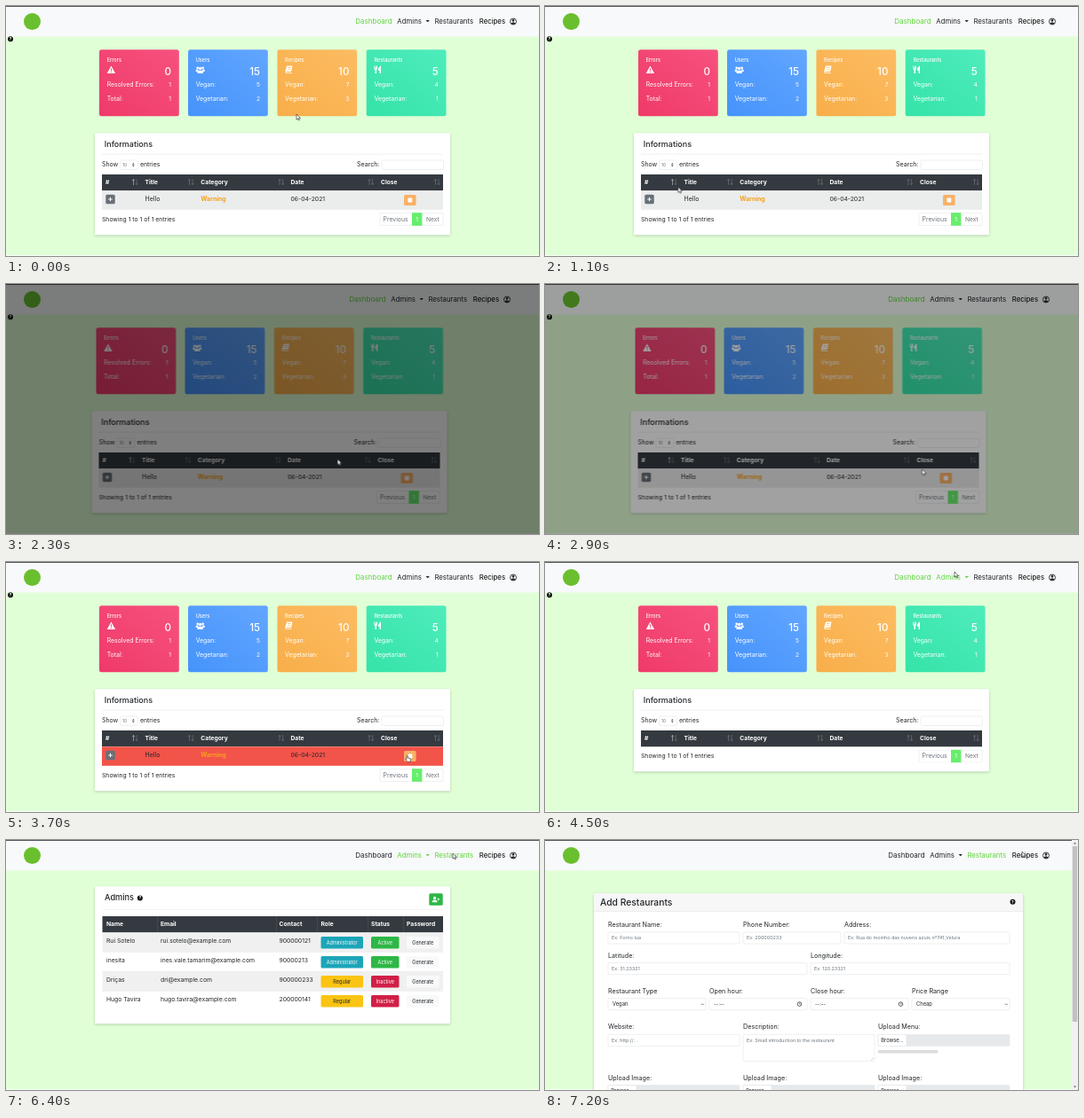
Recreate the animation shown at these times as an HTML page. Size 600 px wide and 282 px high, loop 7300 ms.

```html
<!DOCTYPE html>
<html lang="en">
<head>
<meta charset="utf-8">
<title>Dashboard tour</title>
<style>
html, body { margin: 0; width: 100%; height: 100%; overflow: hidden; background: #e0ffd6; }
svg { display: block; width: 600px; height: 282px; }
text { font-family: Inter, sans-serif; fill: #212529; white-space: pre; }
.w { fill: #fff; }
.g { fill: #6c757d; }
.b { font-weight: 700; }
.m { font-weight: 500; }
.mid { text-anchor: middle; }
.end { text-anchor: end; }
.card { fill: #fff; filter: drop-shadow(0 1px 1.5px #0003); }
.box { fill: #fff; stroke: #dcdfe2; stroke-width: .5; }

.nav, .dash, .dashPage, .adminPage, .formPage, .row, .foot, .infoCard, .dim, .red,
.lDash, .lAdmins, .lRest, .cur, .arrow, .hand { animation: 7.3s step-end infinite; }
.lDash, .lDash text { fill: #5fd63c; }
.nav { animation-name: nav; }
.dash { animation-name: dash; }
.dashPage { animation-name: dashPage; }
.adminPage { animation-name: adminPage; }
.formPage { animation-name: formPage; }
.row { animation-name: row; }
.foot { animation-name: foot; }
.infoCard { animation-name: infoCard; }
.dim { animation-name: dim; animation-timing-function: linear; }
.red { animation-name: red; animation-timing-function: linear; }
.lDash { animation-name: lDash; }
.lAdmins { animation-name: lAdmins; }
.lRest { animation-name: lRest; }
.cur { animation-name: cur; animation-timing-function: ease-in-out; }
.arrow { animation-name: arrow; }
.hand { animation-name: hand; }
.nav text { fill: inherit; }

@keyframes nav {
  0%, 41.2% { transform: none; }
  20.5%, 90.4% { transform: translateX(-7px); }
}
@keyframes dash {
  0%, 41.2% { transform: none; }
  20.5% { transform: translateX(-3.5px); }
}
@keyframes dashPage { 0% { visibility: visible; } 72.6%, 100% { visibility: hidden; } }
@keyframes adminPage { 0%, 90.4% { visibility: hidden; } 72.6% { visibility: visible; } }
@keyframes formPage { 0% { visibility: hidden; } 90.4%, 100% { visibility: visible; } }
@keyframes row { 0% { opacity: 1; } 56.1%, 100% { opacity: 0; } }
@keyframes foot { 0% { transform: none; } 56.1%, 100% { transform: translateY(-21.5px); } }
@keyframes infoCard { 0% { height: 115px; } 56.1%, 100% { height: 93px; } }
@keyframes dim {
  0%, 20.5%, 41.1%, 100% { opacity: 0; }
  21.9% { opacity: .43; }
  23.3%, 38.4% { opacity: .5; }
  39.7% { opacity: .38; }
}
@keyframes red { 0%, 47.9% { opacity: 0; } 49.3%, 100% { opacity: 1; } }
@keyframes lDash { 0% { fill: #5fd63c; } 72.6%, 100% { fill: #212529; } }
@keyframes lAdmins { 0%, 90.4% { fill: #212529; } 60.2% { fill: #5fd63c; } }
@keyframes lRest { 0% { fill: #212529; } 84.9%, 100% { fill: #5fd63c; } }
@keyframes cur {
  0%, 4% { transform: translate(327px, 122px); }
  19.2%, 23.3% { transform: translate(118px, 219px); }
  34%, 38.4% { transform: translate(405px, 195px); }
  39.7% { transform: translate(424.5px, 209px); }
  46.6%, 52% { transform: translate(451px, 218px); }
  60.3%, 66% { transform: translate(461px, 11px); }
  72%, 76.7% { transform: translate(461px, 31px); }
  85%, 91% { transform: translate(503px, 15px); }
  98.6%, 100% { transform: translate(537px, 13px); }
}
@keyframes arrow { 0%, 53.4% { opacity: 1; } 45.2% { opacity: 0; } }
@keyframes hand { 0%, 53.4% { opacity: 0; } 45.2% { opacity: 1; } }
</style>
</head>
<body>
<svg id="stage" viewBox="0 0 600 282"></svg>
<script>
const text = (x, y, size, str, cls = '') =>
  `<text x="${x}" y="${y}" font-size="${size}" class="${cls}">${str}</text>`;
const rect = (x, y, w, h, fill, r = 0, cls = '') =>
  `<rect x="${x}" y="${y}" width="${w}" height="${h}" rx="${r}" fill="${fill}" class="${cls}"/>`;
const path = (d, fill = '#fff', more = '') => `<path d="${d}" fill="${fill}" ${more}/>`;
const line = (d, color, width) => path(d, 'none', `stroke="${color}" stroke-width="${width}"`);
const group = (cls, ...parts) => `<g class="${cls}">${parts.flat().join('')}</g>`;
const at = (x, y, body) => `<g transform="translate(${x} ${y})">${body}</g>`;
const help = (x, y) => `<circle cx="${x}" cy="${y}" r="3" fill="#111"/>` +
  text(x, y + 1.8, 5, '?', 'w b mid');
const button = (x, y, w, h, fill, label, cls) =>
  rect(x, y, w, h, fill, 1.5) + text(x + w / 2, y + h / 2 + 2, 5.5, label, cls + ' mid');

const nav = () => [
  rect(0, 0, 600, 34.5, '#f8f9fa'),
  rect(0, 0, 600, 1, '#55585a'),
  '<circle cx="29.5" cy="17.5" r="9.5" fill="#6abf2e"/>',
  group('nav',
    group('lDash', text(393.3, 20.3, 8, 'Dashboard')),
    group('lAdmins', text(440.3, 20.3, 7.8, 'Admins'), '<path d="M472.5 16h4.4l-2.2 2.3z"/>'),
    group('lRest', text(482.4, 20.3, 7.8, 'Restaurants')),
    text(532.8, 20.3, 7.8, 'Recipes'),
    '<circle cx="571" cy="17.5" r="3.5" fill="none" stroke="#212529" stroke-width=".9"/>',
    path('M569.6 16.3a1.4 1.4 0 1 1 2.8 0a1.4 1.4 0 1 1-2.8 0M568.4 19.8q2.6-3 5.2 0q-2.6 2-5.2 0', '#212529'))
];

const icons = {
  warn: path('M4.7 0L9.4 8.4H0zM4.2 2.8v2.8h1V2.8zM4.2 6.3v1.1h1V6.3z', '#fff', 'fill-rule="evenodd"'),
  users: [[2, 2.2, 1.3], [8, 2.2, 1.3], [5, 3, 1.8]].map(([x, y, r]) =>
    `<circle cx="${x}" cy="${y}" r="${r}" fill="#fff"/>`).join('') +
    path('M0 6.5V5q0-1.3 2-1.3L3 5L2 6.5zM10 6.5V5q0-1.3-2-1.3L7 5L8 6.5zM1.8 8.6V7q0-1.8 3.2-1.8T8.2 7v1.6z'),
  book: path('M2 0H8.4L7 6.5H1.6q-.8.8 0 1.3H7.6V8.6H1.2Q-.3 7.8.2 6zM3 1.8h3.6v.6H2.9zM2.8 3.4h3.6V4H2.7z', '#fff', 'fill-rule="evenodd"'),
  fork: path('M0 0h.8v3h.6V0h.8v3h.6V0h.8v3.4L2.6 4.8v3.8H1.1V4.8L0 3.4zM7.6 0v8.6H6.2V5.6H4.6Q4.4 1 7.6 0')
};

const tile = ([x, title, icon, from, to, rows], i) => {
  const right = x + 81;
  return `<linearGradient id="tile${i}" x1="0" y1="1" x2="1" y2="0"><stop stop-color="${from}"/>` +
    `<stop offset="1" stop-color="${to}"/></linearGradient>` +
    rect(x, 49.3, 89.8, 75, `url(#tile${i})`, 2.5, 'tile') +
    text(x + 8.7, 63, 5.6, title, 'w m') +
    at(x + 8.7, 67.5, icons[icon]) +
    rows.map(([label, n], k) => k
      ? text(x + 8.7, 75 + 15.6 * k + .6, 6.9, label, 'w') + text(right, 75 + 15.6 * k + .6, 6.6, n, 'w end')
      : text(right, 78, 11.6, n, 'w m end')).join('');
};
const diet = (total, vegan, veg) => [['', total], ['Vegan:', vegan], ['Vegetarian:', veg]];
const tiles = [
  [105, 'Errors', 'warn', '#ef3a69', '#f7517e', [['', 0], ['Resolved Errors:', 1], ['Total:', 1]]],
  [205, 'Users', 'users', '#4593fb', '#62a6ff', diet(15, 5, 2)],
  [305.4, 'Recipes', 'book', '#f8ae49', '#fcbc62', diet(10, 7, 3)],
  [405.7, 'Restaurants', 'fork', '#35e3a8', '#4eecbc', diet(5, 4, 1)]
];

const sorter = (x, i) =>
  line(`M${x} 202V195.5m-1.3 1.6l1.3-1.6l1.3 1.6`, i ? '#777d83' : '#c8cbce', .6) +
  line(`M${x + 3.6} 195V201.6m-1.3-1.6l1.3 1.6l1.3-1.6`, '#777d83', .6);

const dashboard = () => [
  help(5, 37.3),
  group('dash',
    tiles.map(tile),
    rect(100, 143.3, 400, 115, '#fff', 1, 'card infoCard'),
    text(110.8, 159.3, 9, 'Informations', 'm'),
    rect(108, 166.8, 384, .5, '#e2e2e2'),
    text(108, 181, 6.9, 'Show'),
    rect(128.5, 174, 20, 10.5, '#fff', 1.5, 'box'),
    text(131, 181, 4.8, '10', 'g'),
    path('M142 178.6l1.3-1.7l1.3 1.7zM142 179.6l1.3 1.7l1.3-1.7z', '#444'),
    text(151, 181, 6.9, 'entries'),
    text(395, 181, 7.1, 'Search:'),
    rect(423, 174, 69.5, 10.5, '#fff', 1.5, 'box'),
    rect(108, 190, 384, 18.3, '#343a40'),
    [[112, '#'], [156.5, 'Title'], [219.3, 'Category'], [320.5, 'Date'], [422, 'Close']]
      .map(([x, s]) => text(x, 201.4, 6.7, s, 'w b')),
    [143.5, 206.5, 308, 409, 483.5].map(sorter),
    group('row',
      rect(108, 208.3, 384, 21.5, '#ebecec'),
      rect(108, 208.3, 384, 21.5, '#f2544a', 0, 'red'),
      rect(112.3, 212.8, 10.4, 10.4, '#687078', 1.5),
      line('M115.3 218h4.4M117.5 215.8v4.4', '#fff', 1),
      text(156.5, 220.3, 7, 'Hello'),
      '<g style="--c:#f7a01d">' + text(219.3, 220.3, 6.9, 'Warning', 'b').replace('<text', '<text style="fill:var(--c)"') + '</g>',
      text(320.5, 220.3, 6.8, '06-04-2021'),
      rect(448, 213, 13.6, 12, '#f9b168', 1.5),
      rect(452.3, 216.6, 5, 4.8, '#fff', .8)),
    group('foot',
      text(108, 242.7, 6.8, 'Showing 1 to 1 of 1 entries'),
      rect(421, 233.4, 71, 14.2, '#fff', 1, 'box'),
      text(424.5, 242.7, 6.9, 'Previous', 'g'),
      rect(457, 233.2, 11.4, 14.6, '#66ee6c'),
      text(462.7, 242.7, 6.7, '1', 'w mid'),
      text(473, 242.7, 6.7, 'Next', 'g')))
];

const people = [
  ['Rui Sotelo', 'rui.sotelo@example.com', '900000121', 1],
  ['inesita', 'ines.vale.tamarim@example.com', '90000213', 1],
  ['Driças', 'dri@example.com', '900000233', 0],
  ['Hugo Tavira', 'hugo.tavira@example.com', '200000141', 0]
];
const person = ([name, mail, phone, admin], i) => {
  const y = 104.4 + 22 * i;
  return rect(108.5, y, 383.5, 22, i % 2 ? '#fff' : '#f0f0f0') +
    rect(108.5, y, 383.5, .4, '#dee2e6') +
    [[113, name], [174, mail], [307.5, phone]].map(([x, s]) => text(x, y + 11.6, 6.8, s)).join('') +
    button(354.5, y + 4.6, 47.5, 13.4, admin ? '#1ca5b8' : '#fbc413', admin ? 'Administrator' : 'Regular', admin ? 'w' : '') +
    button(411, y + 4.6, 31.5, 13.4, admin ? '#2db745' : '#d11f47', admin ? 'Active' : 'Inactive', 'w') +
    button(451, y + 4.6, 36.5, 13.4, '#f8f9fa', 'Generate', '');
};
const admins = () => [
  rect(100, 52.3, 400, 155, '#fff', 1, 'card'),
  text(111, 68.3, 9.2, 'Admins', 'm'),
  help(150.8, 65.6),
  rect(476.3, 60.3, 15.4, 13.4, '#2db745', 1.5),
  path('M481 65.4a1.6 1.6 0 1 1 3.2 0a1.6 1.6 0 1 1-3.2 0M479.7 70.3q0-2.8 2.9-2.8t2.9 2.8zM485.4 66.5h1v-1h.8v1h1v.8h-1v1h-.8v-1h-1z'),
  rect(108.5, 78.3, 383.5, .5, '#e5e5e5'),
  rect(108.5, 86, 383.5, 18.4, '#343a40'),
  [170, 304, 350.5, 407, 447].map(x => rect(x, 86, .4, 18.4, '#596067')),
  [[113, 'Name'], [174, 'Email'], [307.5, 'Contact'], [354.5, 'Role'], [411, 'Status'], [451, 'Password']]
    .map(([x, s]) => text(x, 97.4, 6.7, s, 'w b')),
  people.map(person)
];

const field = (x, y, w, label, hint, h = 13) =>
  text(x, y, 7.2, label) + rect(x, y + 6, w, h, '#fff', 1, 'box') + text(x + 4, y + 14.3, 5.4, hint, 'g');
const choice = (x, y, w, label, value) => field(x, y, w, label, '') +
  text(x + 5, y + 14.6, 5.8, value) + line(`M${x + w - 5} ${y + 12}l1.4 1.4l1.4-1.4`, '#444', .7);
const hour = (x, y, w, label) => field(x, y, w, label, '') + text(x + 5, y + 14.3, 5.6, '--:--') +
  `<circle cx="${x + w - 8.5}" cy="${y + 12.5}" r="2.3" fill="none" stroke="#222" stroke-width=".7"/>` +
  line(`M${x + w - 8.5} ${y + 11}v1.6h1.2`, '#222', .5);
const upload = (x, y, label) => field(x, y, 148, label, '') +
  rect(x, y + 6, 148, 13, '#e6e9ec', 1) + rect(x, y + 6, 32, 13, '#fff', 1, 'box dark') +
  text(x + 16, y + 14.5, 5.8, 'Browse...', 'mid');

const form = () => [
  rect(55, 60, 483, 230, '#fff', 1, 'card'),
  rect(55, 60, 483, 20.5, '#f7f7f7'),
  rect(55, 80.5, 483, .5, '#dfdfdf'),
  text(62, 73.8, 10.3, 'Add Restaurants', 'm'),
  help(526.5, 69.8),
  field(71, 98, 148, 'Restaurant Name:', 'Ex: Forno lua'),
  field(223, 98, 110, 'Phone Number:', 'Ex: 200000233'),
  field(337, 98, 186, 'Address:', 'Ex: Rua do moinho das nuvens azuis nº741,Velura'),
  field(71, 132.6, 224, 'Latitude:', 'Ex: 31.23321'),
  field(299, 132.6, 224, 'Longitude:', 'Ex: 120.23321'),
  choice(71, 172.6, 110, 'Restaurant Type', 'Vegan'),
  hour(185, 172.6, 110, 'Open hour:'),
  hour(299, 172.6, 110, 'Close hour:'),
  choice(413, 172.6, 110, 'Price Range', 'Cheap'),
  field(71, 213.4, 148, 'Website:', 'Ex: http://...'),
  field(223, 213.4, 148, 'Description:', 'Ex: Small introduction to the restaurant', 30),
  line('M367 248.4l2.6-2.6', '#999', .5),
  upload(375, 213.4, 'Upload Menu:'),
  rect(374.5, 237, 68, 3.4, '#dcdcdc', 1.7),
  [71, 223, 375].map(x => upload(x, 270.6, 'Upload Image:')),
  rect(593, 0, 7, 282, '#f1f1f1'),
  path('M595 4.6h3l-1.5-2zM595 277.6h3l-1.5 2z', '#666'),
  rect(593.8, 7, 5.4, 198, '#c1c1c1')
];

const cursor = () => group('cur',
  group('arrow', path('M0 0V6.2L1.5 4.9L2.4 7L3.4 6.6L2.5 4.6H4.4Z', '#fff', 'stroke="#222" stroke-width=".6"')),
  group('hand', path('M0 .6Q.7-.3 1.3.6V3L4.2 3.6Q4.8 4 4.6 5.2L4 7.4H1L-1.4 4.6Q-1.2 3.6 0 4.3Z', '#fff', 'stroke="#222" stroke-width=".6"')));

document.getElementById('stage').innerHTML = [
  rect(0, 0, 600, 282, '#e0ffd6'),
  rect(0, 281.2, 600, .8, '#fff'),
  ...nav(),
  group('dashPage', dashboard()),
  group('adminPage', admins()),
  group('formPage', form()),
  rect(0, 0, 600, 282, '#000', 0, 'dim'),
  cursor()
].join('');
</script>
</body>
</html>
```
